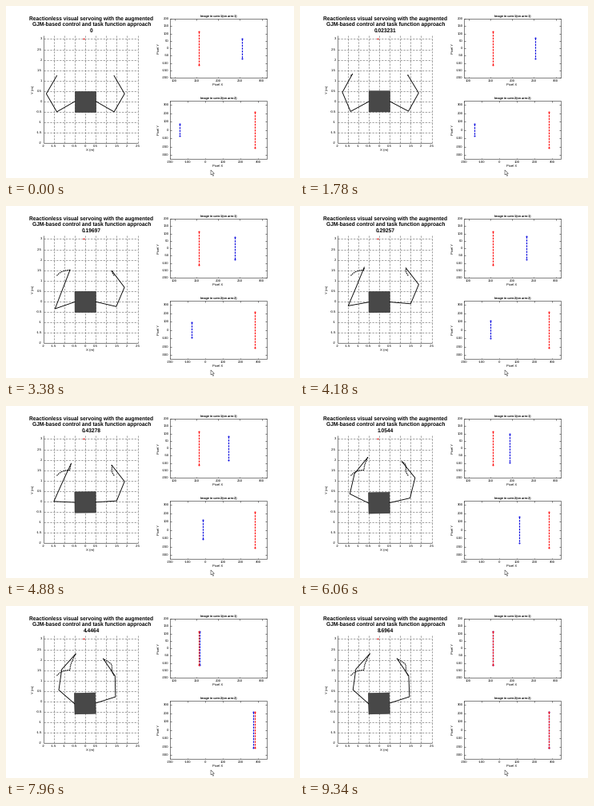
A matplotlib script that plays this animation: 360x216 px, repeating every 9440 ms.

```python
import numpy as np
import matplotlib.pyplot as plt
from matplotlib.animation import FuncAnimation
from matplotlib.collections import LineCollection
from matplotlib.patches import Polygon

W, H, TICK, LOOP = 360, 216, 20, 9440
UNIT = 26.2          # pixels per metre in the robot plot
RATE = 0.88          # decay rate of the image error
RED, BLUE = "#ff1010", "#1010e0"

plt.rcParams["font.family"] = "Liberation Sans"
plt.rcParams["text.hinting"] = "none"   # keeps dots and dashes of tiny text
fig = plt.figure(figsize=(W / 72, H / 72), dpi=72, facecolor="white")
ax = fig.add_axes([0, 0, 1, 1])
ax.set_xlim(0, W)
ax.set_ylim(H, 0)
ax.axis("off")


def label(x, y, text, size=4.2, **kw):
    kw.setdefault("ha", "center")
    return ax.text(x, y, text, fontsize=size, color="black", **kw)


def lines(segments, color="#303030", width=0.6, style="solid"):
    ax.add_collection(LineCollection(segments, colors=color, linewidths=width,
                                     linestyles=style, zorder=1))


def curve(xs, ys, x):
    """Monotone cubic through the rows of ys."""
    xs = np.asarray(xs, float)
    ys = np.asarray(ys, float).reshape(len(xs), -1)
    h = np.diff(xs)
    s = np.diff(ys, axis=0) / h[:, None]
    prod = s[1:] * s[:-1]
    total = np.where(prod > 0, s[1:] + s[:-1], 1)
    mid = np.where(prod > 0, 2 * prod / total, 0)
    m = np.vstack([s[:1], mid, s[-1:]])
    i = np.clip(np.searchsorted(xs, x, "right") - 1, 0, len(xs) - 2)
    d = h[i][:, None]
    u = ((x - xs[i]) / h[i])[:, None]
    return ((1 + 2 * u) * (1 - u) ** 2 * ys[i] + u * (1 - u) ** 2 * d * m[i]
            + u * u * (3 - 2 * u) * ys[i + 1] + u * u * (u - 1) * d * m[i + 1])


# ---- timing: a steady beat with a long start, short beats and pauses ----
hold = np.full(82, 100)
hold[0] = 1100
hold[[1, 45, 81]] = 80
hold[[29, 46]] = 200
starts = np.cumsum(hold)

# solver time grows ever faster from step to step
clock = curve([0, 8, 24, 38, 49, 68, 82],
              [0, 0.023231, 0.19697, 0.43278, 1.0544, 4.4464, 8.6964],
              np.arange(len(starts) + 1))[:, 0]
progress = 1 - np.exp(-RATE * clock)

# ---- robot: base drifts and tilts, link headings pass a few key poses ----
sink = 1 - (1 - progress) ** 1.5
center = np.stack([99.3 - 0.5 * sink, 119.8 + 2.6 * sink], -1)
tilt = 1.5 * progress
headings = curve([0, 0.16, 0.32, 0.6, 1],
                 [[210, 120, 60, -30, 60, 120],
                  [199, 69, 69, -13, 67, 127],
                  [177, 66, 65, 4, 68, 128],
                  [154, 77, 51, 13, 76, 129],
                  [138, 82, 48, 18, 92, 124]], progress)


def ray(angle, length):
    a = np.radians(angle)
    return np.stack([np.cos(a), -np.sin(a)], -1) * length


def arm(side, angles):
    hub = center + ray(tilt, side * UNIT / 2)
    joints = [hub]
    for angle in angles.T:
        joints.append(joints[-1] + ray(angle, UNIT))
    return np.stack(joints, 1)


arms = [arm(-1, headings[:, :3]), arm(1, headings[:, 3:])]
corners = np.stack([center + ray(tilt + a, UNIT / np.sqrt(2))
                    for a in range(45, 360, 90)], 1)

# ---- robot plot ----
LEFT, RIGHT, TOP, BOTTOM = 46.5, 164.5, 37, 172
xs = [(99 + UNIT * v, f"{v:g}") for v in np.arange(-2, 2.6, 0.5)]
ys = [(120 - UNIT * v, f"{v:g}") for v in np.arange(-2, 3.1, 0.5)]
lines([[(x, TOP), (x, BOTTOM)] for x, _ in xs[1:]]
      + [[(LEFT, y), (RIGHT, y)] for y, _ in ys[1:]],
      "#686868", 0.6, (0, (4, 2.5)))
lines([[(LEFT, TOP), (LEFT, BOTTOM)], [(LEFT, BOTTOM), (RIGHT, BOTTOM)]])
for x, text in xs:
    label(x, 177.4, text)
for y, text in ys:
    label(44.8, y + 1, text, ha="right")
label(105.5, 182.6, "X (m)")
label(34, 104.5, "Y (m)", rotation=90, va="center")
for y, text in ((17.2, "Reactionless visual servoing with the augmented"),
                (25, "GJM-based control and task function approach")):
    label(107, y, text, 6.6, weight="bold")
readout = label(107, 32.8, "0", 6.6, weight="bold")
ax.plot([97], [41], "s", color=RED, ms=1.6, mew=0, zorder=3)


# ---- camera plots ----
def camera(title, x0, y0, x1, y1, xticks, yticks):
    segs = [[(x0, y0), (x1, y0), (x1, y1), (x0, y1), (x0, y0)]]
    for x, v in xticks:
        segs += [[(x, y1), (x, y1 - 1.5)], [(x, y0), (x, y0 + 1.5)]]
        label(x, y1 + 5, str(v))
    for y, v in yticks:
        segs += [[(x0, y), (x0 + 1.5, y)], [(x1, y), (x1 - 1.5, y)]]
        label(x0 - 1.5, y + 1, str(v), ha="right")
    lines(segs)
    label(265.3, y0 - 2, title, 3.75, weight="bold")
    label(264.8, y1 + 10, "Pixel X")
    label(191, (y0 + y1) / 2, "Pixel Y", rotation=90, va="center")


camera("Image in cam-1(on arm-1)", 205, 16, 325.5, 90,
       [(210.5 + 0.546 * (v - 100), v) for v in range(100, 301, 50)],
       [(53 - 0.185 * v, v) for v in range(-200, 201, 50)])
camera("Image in cam-2(on arm-2)", 205, 119, 325.5, 192,
       [(249 + 0.22 * v, v) for v in range(-200, 301, 100)],
       [(155.5 - 0.105 * v, v) for v in range(-300, 301, 100)])


def feature(x, ya, yb, color, z):
    bar, = ax.plot([x, x], [ya, yb], color=color, lw=1.2, dashes=(2, 1),
                   dash_capstyle="butt", zorder=z)
    ends, = ax.plot([x, x], [ya, yb], "o", color=color, ms=2, mew=0, zorder=z)
    return bar, ends


# start and goal of each feature pair: x, top, bottom
views = [np.array([[295, 40.5, 65.5], [240.5, 31.5, 74]]),
         np.array([[216.5, 148, 162.5], [311, 132.5, 178]])]
seen = [feature(*start, BLUE, 4) for start, _ in views]
for _, goal in views:
    feature(*goal, RED, 5)

# ---- moving parts of the robot ----
base = Polygon(corners[0], fc="#484848", ec="#303030", lw=0.6, zorder=3)
ax.add_patch(base)
links = [ax.plot([], [], color="black", lw=0.9, zorder=4)[0] for _ in arms]
trails = [ax.plot([], [], color="black", lw=1.1, dashes=(1.4, 0.8),
                  dash_capstyle="butt", zorder=4)[0] for _ in arms]

# mouse pointer
ax.add_patch(Polygon([(256, 206), (256, 212), (257.4, 211), (258.7, 213.4),
                      (259.6, 213), (258.5, 210.6), (260.4, 210.4)],
                     fc="white", ec="#303030", lw=0.5, zorder=6))


def draw(frame):
    n = np.searchsorted(starts, frame * TICK, "right")
    readout.set_text(f"{clock[n]:.5g}")
    base.set_xy(corners[n])
    for joints, link, trail in zip(arms, links, trails):
        link.set_data(*joints[n].T)
        trail.set_data(*joints[:n + 1, -1].T)
    for (start, goal), parts in zip(views, seen):
        x, ya, yb = start + (goal - start) * progress[n]
        for part in parts:
            part.set_data([x, x], [ya, yb])
    return []


anim = FuncAnimation(fig, draw, frames=LOOP // TICK, interval=TICK,
                     repeat=True, repeat_delay=0, blit=False)
plt.show()
```
